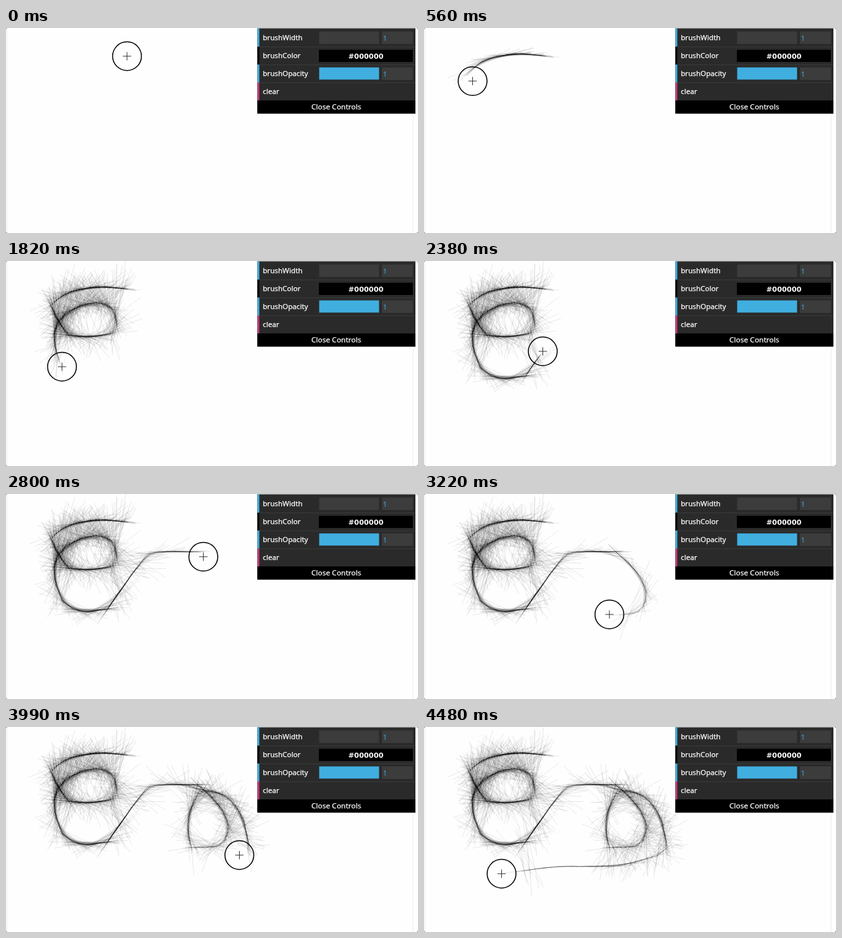
An HTML page with a canvas that plays this animation: 640x320 px, repeating every 4550 ms.

```html
<!DOCTYPE html>
<html lang="en">
<head>
<meta charset="utf-8">
<title>Sketch brush</title>
<style>
  html, body { margin: 0; width: 100%; height: 100%; overflow: hidden; background: #777; }
  #stage { position: relative; width: 640px; height: 320px; overflow: hidden; border-radius: 3px; background: #fefefe; }
  canvas, svg { position: absolute; left: 0; top: 0; }
  text { font: 500 11.15px "Noto Sans", "Open Sans", sans-serif; fill: #fff; stroke: #fff; stroke-width: .25px; }
  .value { fill: #41a9dc; stroke: none; }
  .hex { font: bold 10.9px "DejaVu Sans", sans-serif; text-anchor: middle; stroke: none; }
  .close { font-size: 11.5px; text-anchor: middle; }
  .edge { stroke: #efefef; }
  .line { stroke: #3a3a3a; }
  .blue { fill: #41aee0; }
  .field { fill: #3c3c3c; }
</style>
</head>
<body>
<div id="stage">
  <canvas id="paper" width="640" height="320"></canvas>
  <svg width="640" height="320" viewBox="0 0 640 320">
    <path class="edge" d="M1.5 2V318M632.5 133V320"/>
    <g id="cursor" fill="none" stroke="#000">
      <circle r="22.4" stroke-width="1.5"/>
      <path d="M-6.5 0H6.5M0 -6.5V6.5" stroke="#333"/>
    </g>
    <path d="M390.5 .5H636V133.5H390.5z" fill="#2a2a2a"/>
    <path class="line" d="M394 29.5H636M394 57.5H636M394 85.5H636"/>
    <path class="blue" d="M390.5 .5h3V29h-3zM390.5 57h3v28h-3z"/>
    <path d="M390.5 29h3v28h-3z"/>
    <path d="M390.5 85h3v28h-3z" fill="#c23a78"/>
    <path class="field" d="M486.5 5.5h93v19.5h-93zM584 5.5h48v19.5h-48zM584 61.5h48v19.5h-48z"/>
    <path class="blue" d="M486.5 61.5h93v19h-93z"/>
    <path d="M486 34h146v19h-146zM390.5 113H636v20.5H390.5z"/>
    <text x="399" y="19">brushWidth</text>
    <text x="399" y="47">brushColor</text>
    <text x="399" y="75">brushOpacity</text>
    <text x="399" y="103">clear</text>
    <text class="value" x="585.5" y="20">1</text>
    <text class="value" x="585.5" y="76">1</text>
    <text class="hex" x="559" y="48">#000000</text>
    <text class="close" x="513" y="127">Close Controls</text>
  </svg>
</div>
<script>
  const LOOP = 4550, STEP = 70, SAMPLE = 17.5, LAG = 50;
  const REACH = 58, OVERSHOOT = 0.95, WOBBLE = 1;

  // The pen keeps an even pace along each leg, which ends at the given time.
  const legs = [
    [1120, "M188 44Q105 31 70 69Q80 98 98 116Q130 121 160 114Q178 108 169 82"],
    [1820, "M169 82Q162 66 138 65Q100 70 82 94Q66 120 87 165"],
    [2380, "M87 165Q103 184 128 184L158 179L184.5 141"],
    [3220, "M184.5 141L204 114Q222 89 240 90H297Q345 128 345 160Q341 187 318 187.5L288 188"],
    [3990, "M288 188Q274 145 297 107Q306 92 338 106Q372 128 377 189L362.5 200"],
    [4480, "M362.5 200Q350 206 300 217L210 218Q165 222 120.5 229"]
  ].map(([end, d], i, all) => {
    const path = document.createElementNS("http://www.w3.org/2000/svg", "path");
    path.setAttribute("d", d);
    return { start: i ? all[i - 1][0] : 0, end, path, length: path.getTotalLength() };
  });

  function penAt(t) {
    const { start, end, path, length } = legs.find(leg => t <= leg.end);
    return path.getPointAtLength(length * (t - start) / (end - start));
  }

  let seed = 7;
  function random() {
    seed = (seed * 16807) % 2147483647;
    return seed / 2147483647;
  }

  // Each new point links to nearby earlier ones, overshooting both ends.
  const points = [], strokes = [];
  for (let t = 0; t <= 4480; t += SAMPLE) {
    const pen = penAt(t);
    const x = pen.x + (random() - 0.5) * WOBBLE;
    const y = pen.y + (random() - 0.5) * WOBBLE;
    for (const [px, py] of points) {
      const dx = px - x, dy = py - y, d = Math.hypot(dx, dy);
      if (random() < d / REACH) continue;
      const a = random() * OVERSHOOT, b = random() * OVERSHOOT;
      strokes.push([t, x - dx * a, y - dy * a, px + dx * b, py + dy * b]);
    }
    points.push([x, y]);
  }

  const ctx = document.getElementById("paper").getContext("2d");
  const cursor = document.getElementById("cursor");
  ctx.strokeStyle = "rgba(0,0,0,.09)";
  let drawn = 0, last = -1;

  function render(t) {
    if (t < last) {
      ctx.clearRect(0, 0, 640, 320);
      drawn = 0;
    }
    last = t;
    while (drawn < strokes.length && strokes[drawn][0] <= t - LAG) {
      const [, x0, y0, x1, y1] = strokes[drawn++];
      ctx.beginPath();
      ctx.moveTo(x0, y0);
      ctx.lineTo(x1, y1);
      ctx.stroke();
    }
    const { x, y } = penAt(t);
    cursor.setAttribute("transform", `translate(${x} ${y})`);
  }

  const start = performance.now();
  function tick() {
    const t = (performance.now() - start) % LOOP;
    render(Math.floor(t / STEP) * STEP);
    requestAnimationFrame(tick);
  }
  tick();
</script>
</body>
</html>
```
